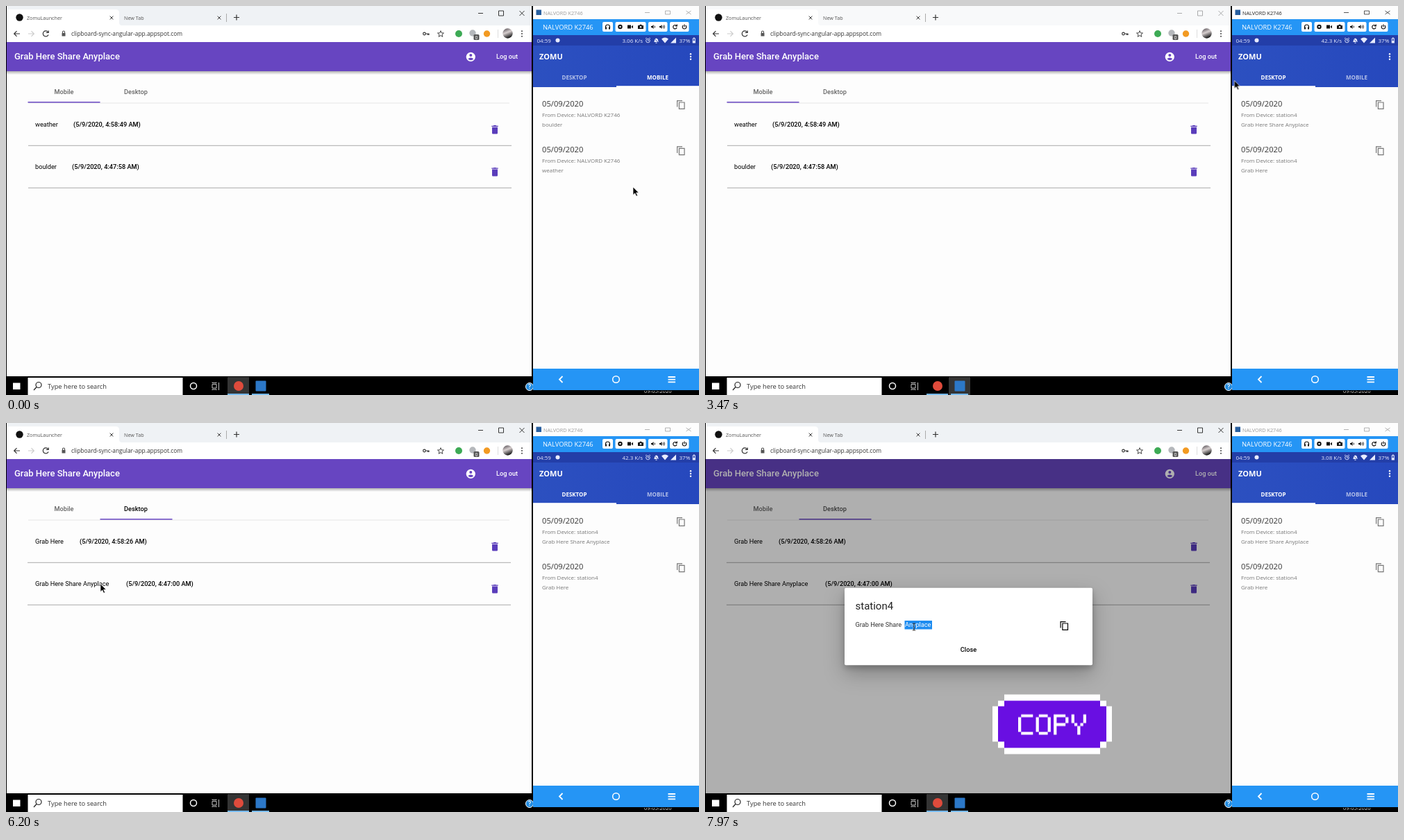
Write an HTML page that moves like this. It is 998 by 561 pixels and loops after 8000 ms.

```html
<!DOCTYPE html>
<html lang="en">
<head>
<meta charset="utf-8">
<title>Clipboard sync</title>
<style>
html, body { margin: 0; width: 100%; height: 100%; overflow: hidden; background: #000; }
svg { display: block; width: 998px; height: 561px; }
text { font-family: Roboto, Arial, sans-serif; font-size: 9.2px; white-space: pre; }
.sys, .sys text, .phone text { font-family: "Open Sans", "Noto Sans", sans-serif; }
.phone .small { font-size: 8px; }
.phone .date { font-size: 11.2px; }
.mid { text-anchor: middle; }
.end { text-anchor: end; }
.b { font-weight: 500; }
.line { fill: none; stroke: currentColor; stroke-width: 1.2; }
.thin { stroke-width: .9; }

/* Everything shares one 8 s clock: 1% = 80 ms. */
.anim { animation: 8s linear infinite; }
.browser-focus { animation-name: browser-focus; }
.phone-focus { animation-name: phone-focus; }
.browser-on { animation-name: browser-on; }
.phone-on { animation-name: phone-on; }
@keyframes browser-focus { 0%, 30.2% { opacity: 1 } 30.21%, 60.6% { opacity: .4 } 60.61%, 100% { opacity: 1 } }
@keyframes phone-focus { 0%, 30.2% { opacity: .45 } 30.21%, 60.6% { opacity: 1 } 60.61%, 100% { opacity: .45 } }
@keyframes browser-on { 0%, 30.2% { opacity: 1 } 30.21%, 60.6% { opacity: 0 } 60.61%, 100% { opacity: 1 } }
@keyframes phone-on { 0%, 30.2% { opacity: 0 } 30.21%, 60.6% { opacity: 1 } 60.61%, 100% { opacity: 0 } }

.speed1 { animation-name: speed1; }
.speed2 { animation-name: speed2; }
.speed3 { animation-name: speed3; }
.speed4 { animation-name: speed4; }
@keyframes speed1 { 0%, 10% { opacity: 1 } 10.01%, 100% { opacity: 0 } }
@keyframes speed2 { 0%, 10% { opacity: 0 } 10.01%, 43% { opacity: 1 } 43.01%, 100% { opacity: 0 } }
@keyframes speed3 { 0%, 43% { opacity: 0 } 43.01%, 95.5% { opacity: 1 } 95.51%, 100% { opacity: 0 } }
@keyframes speed4 { 0%, 95.5% { opacity: 0 } 95.51%, 100% { opacity: 1 } }

.pager { animation-name: pager; }
.phone-bar { animation-name: phone-bar; }
.ripple { animation-name: ripple; }
.phone-desktop { animation-name: dim-to-lit; }
.phone-mobile { animation-name: lit-to-dim; }
@keyframes pager { 0%, 30.25% { transform: translateX(-240px); animation-timing-function: cubic-bezier(.2,.8,.3,1) } 34.55%, 100% { transform: none } }
@keyframes phone-bar { 0%, 30.25% { transform: translateX(120px); animation-timing-function: cubic-bezier(.2,.8,.3,1) } 33.1%, 100% { transform: none } }
@keyframes ripple { 0%, 30.2% { opacity: 0 } 31%, 32.5% { opacity: .46 } 36%, 100% { opacity: 0 } }
@keyframes dim-to-lit { 0%, 30.25% { opacity: .65 } 30.26%, 100% { opacity: 1 } }
@keyframes lit-to-dim { 0%, 30.25% { opacity: 1 } 30.26%, 100% { opacity: .65 } }

.web-pages { animation-name: web-pages; }
.web-bar { animation-name: web-bar; }
.web-desktop { animation-name: web-desktop; }
@keyframes web-pages { 0%, 60.8% { transform: none; animation-timing-function: cubic-bezier(.35,0,.25,1) } 67.05%, 100% { transform: translateX(-695px) } }
@keyframes web-bar { 0%, 60.8% { transform: none; animation-timing-function: cubic-bezier(.35,0,.25,1) } 67.05%, 100% { transform: translateX(104px) } }
@keyframes web-desktop { 0%, 60.6% { opacity: .6 } 60.8%, 83% { opacity: 1 } 83.2%, 100% { opacity: .7 } }

.backdrop { animation-name: backdrop; }
.dialog { animation-name: dialog; transform-origin: 379.5px 293.5px; filter: drop-shadow(0 4px 4px #0003) drop-shadow(0 11px 14px #0004); }
.selected { animation-name: selected; }
@keyframes backdrop { 0%, 83.2% { opacity: 0; animation-timing-function: cubic-bezier(.25,.3,.25,1) } 88.2%, 100% { opacity: .31 } }
@keyframes dialog {
  0%, 83.2% { opacity: 0; transform: scale(.7); animation-timing-function: cubic-bezier(0,0,.2,1) }
  85.1%, 100% { opacity: 1; transform: none }
}
@keyframes selected { 0%, 96.2% { opacity: 0 } 96.21%, 100% { opacity: 1 } }

.sticker { animation-name: sticker; }
.sticker-text { animation-name: sticker-text; }
@keyframes sticker { 0%, 81.8% { opacity: 0 } 81.81%, 100% { opacity: 1 } }
@keyframes sticker-text { 0%, 82.6% { clip-path: inset(0 50%) } 83.75% { clip-path: inset(0 32.7%) } 87.2%, 100% { clip-path: inset(0 0) } }

.cursor { animation-name: cursor; }
.arrow { animation-name: arrow; }
.hand { animation-name: hand; }
.beam { animation-name: beam; }
@keyframes cursor {
  0%, 2.5% { transform: translate(903px,261px); animation-timing-function: ease-in-out }
  13.5%, 41% { transform: translate(813px,107px); animation-timing-function: ease-in-out }
  53%, 63% { transform: translate(186px,113px); animation-timing-function: ease-in-out }
  74%, 81.5% { transform: translate(136px,232px); animation-timing-function: ease-in-out }
  83.75%, 85.5% { transform: translate(145px,246px); animation-timing-function: ease-in-out }
  93%, 100% { transform: translate(301px,294px) }
}
@keyframes arrow { 0%, 51.5% { opacity: 1 } 51.51%, 66% { opacity: 0 } 66.01%, 90.5% { opacity: 1 } 90.51%, 100% { opacity: 0 } }
@keyframes hand { 0%, 51.5% { opacity: 0 } 51.51%, 66% { opacity: 1 } 66.01%, 100% { opacity: 0 } }
@keyframes beam { 0%, 90.5% { opacity: 0 } 90.51%, 100% { opacity: 1 } }
</style>
</head>
<body>
<svg viewBox="0 0 998 561">
<defs>
  <linearGradient id="phoneBar"><stop stop-color="#2c50c0"/><stop offset="1" stop-color="#2648bd"/></linearGradient>
  <linearGradient id="photo" x2=".4" y2="1"><stop stop-color="#453f45"/><stop offset=".5" stop-color="#d8d0d0"/><stop offset="1" stop-color="#222"/></linearGradient>
  <linearGradient id="shade" x2="0" y2="1"><stop stop-color="#000" stop-opacity=".3"/><stop offset="1" stop-color="#000" stop-opacity="0"/></linearGradient>
  <clipPath id="browserClip"><path d="M1 0H757V534H1z"/></clipPath>
  <clipPath id="listClip"><path d="M31 141H728V534H31z"/></clipPath>
  <clipPath id="phoneClip"><path d="M759 117H998V523H759z"/></clipPath>
  <clipPath id="dateClip"><path d="M900 555H998V561H900z"/></clipPath>
  <g id="copyIcon" class="line"><path d="M.6 9.6V.6H8"/><path d="M3.4 3H11V12.4H3.4z"/></g>
  <path id="trash" d="M-4 -3.6H4V5Q4 6.2 2.8 6.2H-2.8Q-4 6.2 -4 5zM-4.7 -5.6H-2.2L-1.5 -6.3H1.5L2.2 -5.6H4.7V-4.4H-4.7z" fill="#5a3dbb"/>
  <path id="close" class="line" d="M-3 -3L3 3M3 -3L-3 3"/>
  <path id="winButtons" class="line thin" d="M-33 0H-26M-3.5 -3.5H3.5V3.5H-3.5zM26.5 -3.5l7 7m0 -7l-7 7"/>
</defs>

<rect width="998" height="561"/>

<g clip-path="url(#browserClip)">
  <rect x="1" width="756" height="534" fill="#fdfdfd"/>
  <rect class="anim browser-focus" x="1" width="756" height="28" fill="#eff2f5"/>
  <path d="M1 28V6Q1 5 3 5H158Q163 5 163 10V24Q163 28 167 28z" fill="#fff"/>
  <rect x="1" y="28" width="756" height="24" fill="#fff"/>
  <circle cx="19.500" cy="16.500" r="5.200" fill="#111"/>
  <g class="sys" fill="#555">
    <text x="30" y="19.500" style="font-size:7.2px">ZomuLauncher</text>
    <text x="170" y="19.500" style="font-size:7.2px">New Tab</text>
    <text x="94" y="43" fill="#333" style="font-size:8.4px">clipboard-sync-angular-app.appspot.com</text>
  </g>
  <g color="#333">
    <use href="#close" transform="translate(152 17) scale(.8)"/>
    <use href="#close" transform="translate(307 17) scale(.8)"/>
    <path class="line" d="M332 12.500V20.500M328 16.500H336"/>
    <path d="M317.500 11V23" stroke="#aaa"/>
    <path class="line" d="M20 40H12M15.500 36.200L11.700 40L15.500 43.800"/>
    <path class="line" d="M32 40H40M36.500 36.200L40.300 40L36.500 43.800" color="#ccc"/>
    <path class="line" d="M60.500 37.500A4 4 0 1 0 61 41.500M61.200 35.500V38.400H58"/>
    <path d="M80.500 39H85.500V43.500H80.500z" fill="#555"/><path class="line" d="M81.500 39V37.500A1.500 1.500 0 0 1 84.500 37.500V39" color="#555"/>
    <circle class="line" cx="602.500" cy="40" r="1.800"/><path class="line" d="M604.500 40H609.500M607.500 40V42M609 40V42"/>
    <path class="line thin" d="M626 35.700L627.200 38.800L630.500 39L628 41.100L628.800 44.300L626 42.500L623.200 44.300L624 41.100L621.500 39L624.800 38.800z"/>
  </g>
  <circle cx="652" cy="40" r="5" fill="#3daa55"/>
  <circle cx="672" cy="39" r="4.700" fill="#b5b8bc"/>
  <rect x="673.500" y="41" width="8" height="8" rx="1.500" fill="#555"/>
  <text class="mid" x="677.500" y="47.600" fill="#fff" style="font-size:7px">0</text>
  <circle cx="692.500" cy="40" r="4.700" fill="#f29a22"/>
  <path d="M708.500 34V46" stroke="#ddd"/>
  <circle cx="722.500" cy="39.500" r="7.200" fill="url(#photo)"/>
  <g fill="#444"><circle cx="743" cy="36.300" r="1"/><circle cx="743" cy="40" r="1"/><circle cx="743" cy="43.700" r="1"/></g>
  <g class="anim browser-focus" color="#222"><use href="#winButtons" x="713" y="10.500"/></g>

  <rect x="1" y="94" width="756" height="5" fill="url(#shade)"/>
  <rect x="1" y="52" width="756" height="42" fill="#6745c1"/>
  <g fill="#fff" class="b">
    <text x="12" y="77" style="font-size:13px">Grab Here Share Anyplace</text>
    <text x="706" y="75.800">Log out</text>
    <circle cx="669.300" cy="73.300" r="6.600"/>
  </g>
  <g fill="#6745c1"><circle cx="669.300" cy="71" r="2"/><path d="M665.300 76.300Q669.300 72.800 673.300 76.300Q669.300 80 665.300 76.300z"/></g>

  <text class="b mid" x="83.500" y="127.300" opacity=".6">Mobile</text>
  <text class="b mid anim web-desktop" x="187" y="127.300">Desktop</text>
  <path d="M32 140H725" stroke="#e6e6e6"/>
  <rect class="anim web-bar" x="31.500" y="138" width="104" height="1.500" fill="#6745c1"/>

  <g clip-path="url(#listClip)">
    <g class="anim web-pages">
      <g id="rules">
        <path d="M32 201.300H727M32 262.300H727" stroke="#aaa"/>
        <use href="#trash" x="704" y="178.300"/><use href="#trash" x="704" y="239.200"/>
      </g>
      <text x="42" y="174.300">weather</text><text class="b" x="97" y="174.300">(5/9/2020, 4:58:49 AM)</text>
      <text x="42" y="235">boulder</text><text class="b" x="95" y="235">(5/9/2020, 4:47:58 AM)</text>
      <g transform="translate(695)">
        <use href="#rules"/>
        <text x="42" y="174.300">Grab Here</text><text class="b" x="106" y="174.300">(5/9/2020, 4:58:26 AM)</text>
        <text x="42" y="235">Grab Here Share Anyplace</text><text class="b" x="173" y="235">(5/9/2020, 4:47:00 AM)</text>
      </g>
    </g>
  </g>

  <rect class="anim backdrop" x="1" y="52" width="756" height="482"/>
  <g class="anim dialog">
    <rect x="201" y="237.700" width="357" height="111.500" rx="2" fill="#fff"/>
    <text x="216.500" y="269" style="font-size:15px" fill="#222">station4</text>
    <text x="216.500" y="294.300" fill="#333">Grab Here Share</text>
    <text x="288" y="294.300" fill="#333">Anyplace</text>
    <g class="anim selected">
      <rect x="287.500" y="285" width="39.500" height="12.500" fill="#1e8cf0"/>
      <text x="288" y="294.300" fill="#fff">Anyplace</text>
    </g>
    <use href="#copyIcon" x="511.500" y="286"/>
    <text class="b mid" x="379.500" y="330.300">Close</text>
  </g>
</g>

<g class="anim sticker" transform="translate(0 -.5)">
  <path fill="#fff" d="M431 392H569V401H578V409H586V460H578V469H569V478H431V469H422V460H414V409H422V401H431z"/>
  <path fill="#690fe2" d="M431 401H569V409H578V460H569V469H431V460H422V409H431z"/>
  <g class="anim sticker-text">
    <path transform="translate(451 420.500) scale(4.260)" fill="#fff" d="M1 0H5V1H1zM0 1H1V6H0zM1 6H5V7H1z
      M7 0H10V1H7zM6 1H7V6H6zM10 1H11V6H10zM7 6H10V7H7z
      M12 0H16V1H12zM12 1H13V7H12zM16 1H17V3H16zM13 3H16V4H13z
      M18 0H19V3H18zM22 0H23V3H22zM19 3H20V4H19zM21 3H22V4H21zM20 4H21V7H20z"/>
  </g>
</g>

<g>
  <path d="M10 543.500H20.500V553H10z" fill="#fff"/>
  <rect x="31.500" y="536" width="223" height="25" fill="#fff"/>
  <circle class="line" cx="47" cy="546.500" r="4" color="#222"/><path class="line" d="M44 549.500L40 554" color="#222"/>
  <text class="sys" x="60" y="552" fill="#333" style="font-size:9.3px">Type here to search</text>
  <circle class="line" cx="270" cy="548" r="4.500" color="#fff" style="stroke-width:1.500"/>
  <path class="line thin" color="#ddd" d="M297 545.500H303V551H297zM297 542.500V543.500H303V542.500M297 554V553H303V554M306.500 543V554"/>
  <rect class="anim browser-on" x="319" y="535" width="31" height="26" fill="#343434"/>
  <rect class="anim phone-on" x="351" y="535" width="31" height="26" fill="#343434"/>
  <path d="M319 560H350M354 560H379" stroke="#76b9ed" stroke-width="2"/>
  <circle cx="335" cy="548" r="7" fill="#df4b3c"/>
  <rect x="359.500" y="540.500" width="15" height="15" rx="1" fill="#2c78c8"/>
  <circle cx="754" cy="549" r="5.500" fill="#218be0" stroke="#fff"/>
  <text class="b mid" x="754" y="552.300" fill="#fff">?</text>
</g>

<g class="phone">
  <rect x="759" width="239" height="555" fill="#fdfdfd"/>
  <rect x="763.500" y="5.500" width="7.500" height="7.500" fill="#285f9f"/>
  <g class="anim phone-focus" color="#222">
    <text x="774" y="12.500" fill="#222" style="font-size:7.300px">NALVORD K2746</text>
    <use href="#winButtons" transform="translate(953 9.500) scale(1 .7)"/>
  </g>
  <rect x="759" y="19" width="239" height="23" fill="#2595f5"/>
  <text x="773" y="33.500" fill="#fff" style="font-size:9.400px">NALVORD K2746</text>
  <g fill="#fff">
    <rect x="859" y="23" width="15" height="14" rx="2"/><rect x="877.500" y="23" width="44" height="14" rx="2"/>
    <rect x="925" y="23" width="27.500" height="14" rx="2"/><rect x="956" y="23" width="27.500" height="14" rx="2"/>
  </g>
  <g fill="#111" color="#111">
    <path class="line" d="M863.500 32V30A3 3 0 0 1 869.500 30V32"/><path d="M863 30.500h2v3h-2zM868 30.500h2v3h-2z"/>
    <circle class="line" cx="884.500" cy="30" r="2.200" style="stroke-width:2"/>
    <path d="M895 27.500h5v5h-5zM900.500 30l2.500 -2.500v5zM910 28h2l1 -1.300h2l1 1.300h2v5h-8z"/>
    <circle cx="914" cy="30.300" r="1.200" fill="#fff"/>
    <path d="M929 29h1.500l2 -2v6l-2 -2h-1.500zM941 29h1.500l2 -2v6l-2 -2h-1.500z"/>
    <path class="line thin" d="M934 28.500q1 1.500 0 3M946 28.500q1 1.500 0 3M947.500 27.300q2 2.700 0 5.400"/>
    <path class="line" d="M965.500 28.500A2.700 2.700 0 1 0 966 31M966.300 26.500v2.300h-2.300M975.300 28A2.800 2.800 0 1 0 978.700 28M977 26.500v3.500"/>
  </g>

  <rect x="759" y="42" width="239" height="75" fill="url(#phoneBar)"/>
  <rect x="759" y="42" width="239" height="15" fill="#233ea8"/>
  <g fill="#e8ecff" color="#e8ecff">
    <text class="small" x="764.500" y="52.500">04:59</text>
    <circle cx="794.500" cy="49.500" r="3"/>
    <g class="end">
      <text class="small anim speed1" x="917" y="52.500">3.06 K/s</text>
      <text class="small anim speed2" x="917" y="52.500">3.53 K/s</text>
      <text class="small anim speed3" x="917" y="52.500">42.3 K/s</text>
      <text class="small anim speed4" x="917" y="52.500">3.08 K/s</text>
    </g>
    <circle class="line thin" cx="924.500" cy="50" r="2.800"/><path class="line thin" d="M924.500 48.500V50H926M921 47l1.500 -1.200M928 47l-1.500 -1.200"/>
    <path d="M933 52q1 -1 1 -3.500q2.500 -4 5 0q0 2.500 1 3.500zM935.500 52.800h2v1h-2z"/><path d="M932.500 46l8 7.500" stroke="#233ea8" stroke-width=".8"/>
    <path d="M944 47.500Q949 43.500 954 47.500L949 53.500zM965 45.500V53.500H957z"/>
    <text class="small" x="969.500" y="52.500">37%</text>
    <path d="M988.700 46.500h1.300v-1h1.600v1h1.300v7h-4.200z"/><path d="M989.500 47.300h2.600v3h-2.600z" fill="#5068bd"/>
  </g>
  <text x="768" y="77.300" fill="#fff" style="font-size:11px;font-weight:700">ZOMU</text>
  <g fill="#fff"><circle cx="986" cy="69.200" r="1.200"/><circle cx="986" cy="73" r="1.200"/><circle cx="986" cy="76.800" r="1.200"/></g>
  <rect class="anim ripple" x="759" y="89" width="120" height="28" fill="#fff"/>
  <g fill="#fff" class="mid" style="font-weight:700">
    <text class="small anim phone-desktop" x="818.500" y="106">DESKTOP</text>
    <text class="small anim phone-mobile" x="938.500" y="106">MOBILE</text>
  </g>
  <rect class="anim phone-bar" x="759" y="115.200" width="120" height="1.800" fill="#fff"/>

  <g clip-path="url(#phoneClip)">
    <g class="anim pager">
      <g id="cards">
        <text class="date" x="772" y="144.800" fill="#333">05/09/2020</text>
        <text class="date" x="772" y="211.100" fill="#333">05/09/2020</text>
        <g color="#777"><use href="#copyIcon" x="966" y="136"/><use href="#copyIcon" x="966" y="202.300"/></g>
      </g>
      <use href="#cards" x="240"/>
      <g fill="#777">
        <text class="small" x="772" y="160">From Device: station4</text>
        <text class="small" x="772" y="173.800">Grab Here Share Anyplace</text>
        <text class="small" x="772" y="226.300">From Device: station4</text>
        <text class="small" x="772" y="240.100">Grab Here</text>
        <text class="small" x="1012" y="160">From Device: NALVORD K2746</text>
        <text class="small" x="1012" y="173.800">boulder</text>
        <text class="small" x="1012" y="226.300">From Device: NALVORD K2746</text>
        <text class="small" x="1012" y="240.100">weather</text>
      </g>
    </g>
  </g>

  <rect x="759" y="523" width="239" height="31" fill="#2595f5"/>
  <g class="line" color="#fff" style="stroke-width:1.800">
    <path d="M801.500 534L797 538.500L801.500 543"/><circle cx="878.500" cy="538.500" r="4.800" style="stroke-width:1.500"/>
    <path d="M953.500 535H964M953.500 538.700H964M953.500 542.400H964"/>
  </g>
  <rect x="759" y="554" width="239" height="7"/>
  <g clip-path="url(#dateClip)"><text x="919" y="558" fill="#ddd" style="font-size:7.600px">09-05-2020</text></g>
</g>

<g class="anim cursor">
  <path class="anim arrow" d="M0 0V11.500L2.700 9L4.700 13.300L6.600 12.400L4.600 8.300H8.200z" stroke="#fff" stroke-width=".7"/>
  <path class="anim hand" d="M-.8 8V1.200Q0 -.4 1 1.200V4.700L4.300 5.500Q5.300 6 5.100 7.300L4.200 12H-1L-4 8.300Q-3.600 6.600 -2.300 7.200z" fill="#fff" stroke="#333" stroke-width=".9"/>
  <path class="anim beam" d="M-2 -5H-.5L0 -4.500L.5 -5H2M0 -4.500V4.500M-2 5H-.5L0 4.500L.5 5H2" fill="none" stroke="#111"/>
</g>
</svg>
</body>
</html>
```
